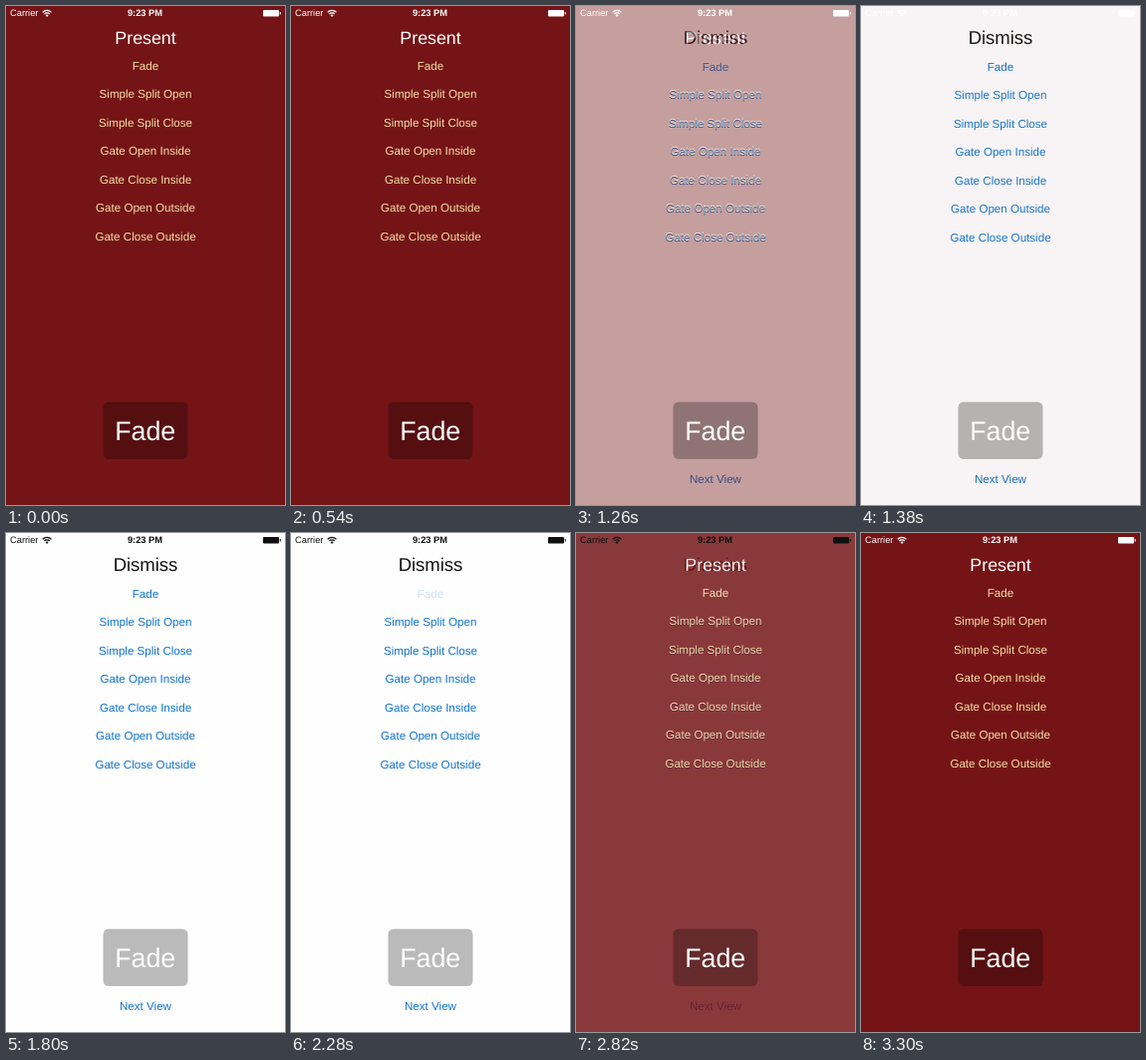
Recreate the animation shown at these times as an HTML page. Size 280 by 500 pixels, loop 3600 ms.

```html
<!DOCTYPE html>
<html lang="en">
<head>
<meta charset="utf-8">
<title>Fade transition</title>
<style>
  html, body { margin: 0; width: 100%; height: 100%; overflow: hidden; background: #751416; }
  svg { display: block; width: 280px; height: 500px; font: 11.6px "Liberation Sans", Arial, sans-serif; }
  text { text-anchor: middle; text-rendering: geometricPrecision; }
  #status { font-size: 9.3px; }
</style>
</head>
<body>
<svg viewBox="0 0 280 500">
  <rect width="280" height="500" fill="#751416"/>
  <g id="red" fill="#f6dfa6">
    <text x="140" y="38" font-size="17.8" fill="#fff">Present</text>
  </g>
  <g id="white" fill="#1273cf">
    <rect width="280" height="500" fill="#fefefe"/>
    <text x="140" y="38.4" font-size="18.5" fill="#111">Dismiss</text>
    <text x="140" y="478.4">Next View</text>
  </g>
  <rect x="97.5" y="396.7" width="85" height="57.3" rx="5.5" fill="#000" fill-opacity=".27"/>
  <text x="139.7" y="435" font-size="26.8" fill="#fff">Fade</text>
  <g id="status">
    <text x="4" y="10.3" style="text-anchor:start">Carrier</text>
    <text x="139.5" y="10.3" font-weight="bold">9:23 PM</text>
    <g fill="none" stroke="currentColor" stroke-width="1.3">
      <path d="M36.7 6.2a6.2 6.2 0 0 1 8.8 0M38.5 8a3.7 3.7 0 0 1 5.2 0"/>
      <path d="M41.1 11l-1.5-1.7a2.1 2.1 0 0 1 3 0z" fill="currentColor" stroke="none"/>
    </g>
    <rect x="258" y="4" width="16" height="6.4" rx="1"/>
    <rect x="274.7" y="6" width="1.1" height="2.4" rx=".5"/>
  </g>
</svg>
<script>
const LOOP = 3600, STEP = 60;
const items = ["Fade", "Simple Split Open", "Simple Split Close", "Gate Open Inside",
  "Gate Close Inside", "Gate Open Outside", "Gate Close Outside"];
const $ = id => document.getElementById(id);

// Fills a view with the menu and returns its first entry.
function addMenu(view, top) {
  const entries = items.map((label, i) => {
    const text = document.createElementNS("http://www.w3.org/2000/svg", "text");
    text.setAttribute("x", 140);
    text.setAttribute("y", top + i * 28.5);
    text.textContent = label;
    view.append(text);
    return text;
  });
  return entries[0];
}

const white = $("white"), bar = $("status");
const redFade = addMenu($("red"), 63.9);
const whiteFade = addMenu(white, 64.8);

const ramp = (t, start, length) => Math.min(1, Math.max(0, (t - start) / length));
const ease = p => p * p * (3 - 2 * p);
const fade = (t, start) => ease(ramp(t, start, 380));

function draw(now) {
  const t = Math.floor(now % LOOP / STEP) * STEP;
  white.setAttribute("opacity", fade(t, 1048) - fade(t, 2535));
  redFade.setAttribute("opacity", t >= 800 && t < 2520 ? 0.2 : 1);
  whiteFade.setAttribute("opacity", t >= 2280 ? 0.2 : 1);

  const dark = ramp(t, 1420, 200) - ramp(t, 2920, 200);
  const level = Math.round(255 - 240 * dark);
  bar.style.color = bar.style.fill = `rgb(${level},${level},${level})`;
}

const begin = performance.now();
function tick() {
  draw(performance.now() - begin);
  requestAnimationFrame(tick);
}
tick();
</script>
</body>
</html>
```
